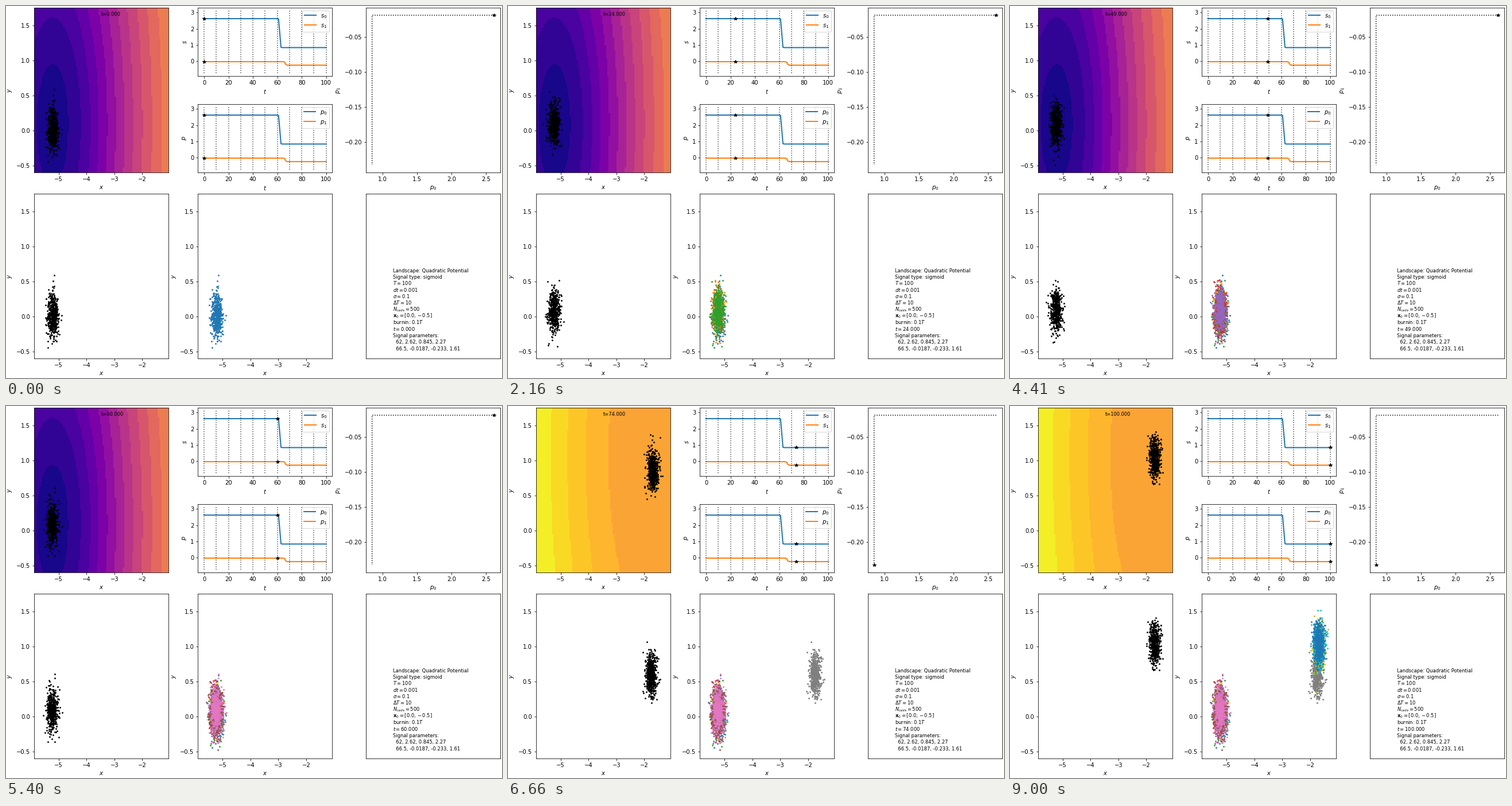
A matplotlib script for the animation above (9.09 s loop, 864 by 648 pixels).

```python
import numpy as np
import matplotlib.pyplot as plt
from matplotlib.animation import FuncAnimation
from matplotlib.colors import BoundaryNorm, ListedColormap

W, H = 864, 648
T, STEP, N_CELLS, SIGMA = 100, 10, 500, 0.1
XLIM, YLIM = (-5.885, -1.065), (-0.598, 1.755)
# switch time, start, end, rate
PARAMS = [(62, 2.62, 0.845, 2.27), (66.5, -0.0187, -0.233, 1.61)]

plt.rcParams.update({"font.family": "DejaVu Sans", "font.size": 10,
                     "mathtext.fontset": "dejavusans"})


def signal(t):
    return np.array([a + (b - a) * (1 + np.tanh(r * (t - tc))) / 2
                     for tc, a, b, r in PARAMS])


def potential(x, y, p):
    return x**2 / 4 + y**2 / 9 + p[0] * x + p[1] * y


def simulate(sub=10):
    """Noisy descent in the potential, recorded at every whole time."""
    rng = np.random.default_rng(7)
    dt = 1 / sub
    stiff = np.array([1 / 2, 2 / 9])
    pos = np.tile([0.0, -0.5], (N_CELLS, 1))
    path = []
    for k in range(-T // 10 + 1, T + 1):
        for i in range(sub):
            drift = -(stiff * pos + signal(k - 1 + i * dt))
            noise = rng.standard_normal(pos.shape)
            pos = pos + drift * dt + SIGMA * np.sqrt(dt) * noise
        if k >= 0:
            path.append(pos)
    return path


cells = simulate()
times = np.arange(T + 1)
curves = signal(times)

fig = plt.figure(figsize=(W / 72, H / 72), dpi=72, facecolor="white")


def panel(x, top, h, xlabel="", ylabel="", w=233.97):
    ax = fig.add_axes([x / W, 1 - (top + h) / H, w / W, h / H])
    ax.set_xlabel(xlabel)
    ax.set_ylabel(ylabel)
    return ax


LEFT, MID, RIGHT = 48.7, 334.37, 627.03
TOP, LOW, TALL, SHORT = 3, 327, 287, 119
land = panel(LEFT, TOP, TALL, "$x$", "$y$")
sig = panel(MID, TOP, SHORT, "$t$", "$s$")
par = panel(MID, TOP + TALL - SHORT, SHORT, "$t$", "$p$")
phase = panel(RIGHT, TOP, TALL, "$p_0$", "$p_1$")
last = panel(LEFT, LOW, TALL, "$x$", "$y$")
trail = panel(MID, LOW, TALL, "$x$", "$y$")
info = panel(RIGHT, LOW, TALL)
info.set(xticks=[], yticks=[])

# Landscape on a log scale, in colour bands
gx = np.linspace(*XLIM, 100)
gy = np.linspace(*YLIM, 100)[:, None]
LOWEST = potential(gx, gy, signal(0)).min()
HIGHEST = 2.475
levels = np.r_[0, np.linspace(0.08, 1.9, 13), np.linspace(2.037, 2.344, 4),
               HIGHEST]
mids = (levels[1:] + levels[:-1]) / 2 / HIGHEST
bands = ListedColormap(plt.get_cmap("plasma")(mids))


def height(t):
    rise = potential(gx, gy, signal(t)) - LOWEST
    return np.clip(np.log1p(np.maximum(rise, 0)), 0, HIGHEST - 1e-6)


heat = land.imshow(height(0), extent=(*XLIM, *YLIM), origin="lower",
                   aspect="auto", interpolation="nearest", cmap=bands,
                   norm=BoundaryNorm(levels, len(mids)))
clock = land.text(0.5, 0.95, "", fontsize="small", transform=land.transAxes)


def dots(ax, color):
    ax.set(xlim=XLIM, ylim=YLIM)
    return ax.plot([], [], ".", color=color, ms=4, alpha=0.85)[0]


cloud = dots(land, "k")
snapshot = dots(last, "k")
layers = [dots(trail, f"C{i % 10}") for i in range(T // STEP + 1)]
for i, layer in enumerate(layers):
    layer.set_data(*cells[i * STEP].T)

# Signals and parameters over time
stars = []
for ax, name in ((sig, "s"), (par, "p")):
    for i, curve in enumerate(curves):
        ax.plot(times, curve, lw=2, label=f"${name}_{i}$")
    ax.vlines(times[::STEP], -0.71, 3.1, colors="k", linestyles=":",
              linewidths=1.5, alpha=0.7)
    ax.set(xlim=(-5, 105), ylim=(-0.9, 3.29), xticks=range(0, 101, 20),
           yticks=range(4))
    ax.legend(loc="upper right")
    stars.append(ax.plot([], [], "k*", zorder=4)[0])

phase.plot(*curves, "k:")
phase_star, = phase.plot([], [], "k*")

INFO = [
    "Landscape: Quadratic Potential",
    "Signal type: sigmoid",
    "$T=100$",
    "$dt=0.001$",
    r"$\sigma=0.1$",
    r"$\Delta T=10$",
    "$N_{cells}=500$",
    r"$\mathbf{x}_0=[0.0, -0.5]$",
    "burnin: $0.1T$",
    "$t=0.000$",
    "Signal parameters:",
    "  62, 2.62, 0.845, 2.27",
    "  66.5, -0.0187, -0.233, 1.61",
]
PITCH = 11.33
notes = [info.text(0.2, 0.05 + i * PITCH / TALL, line, fontsize="small",
                   transform=info.transAxes)
         for i, line in enumerate(reversed(INFO))]
time_note = notes[3]


def update(t):
    heat.set_data(height(t))
    cloud.set_data(*cells[t].T)
    clock.set_text(f"t={t:.3f}")
    time_note.set_text(f"$t={t:.3f}$")
    shot = t // STEP
    snapshot.set_data(*cells[shot * STEP].T)
    for i, layer in enumerate(layers):
        layer.set_visible(i <= shot)
    now = curves[:, t]
    for star in stars:
        star.set_data([t, t], now)
    phase_star.set_data(now[:1], now[1:])
    return []


anim = FuncAnimation(fig, update, frames=T + 1, interval=90, repeat=True,
                     repeat_delay=0, init_func=lambda: update(0))
plt.show()
```
